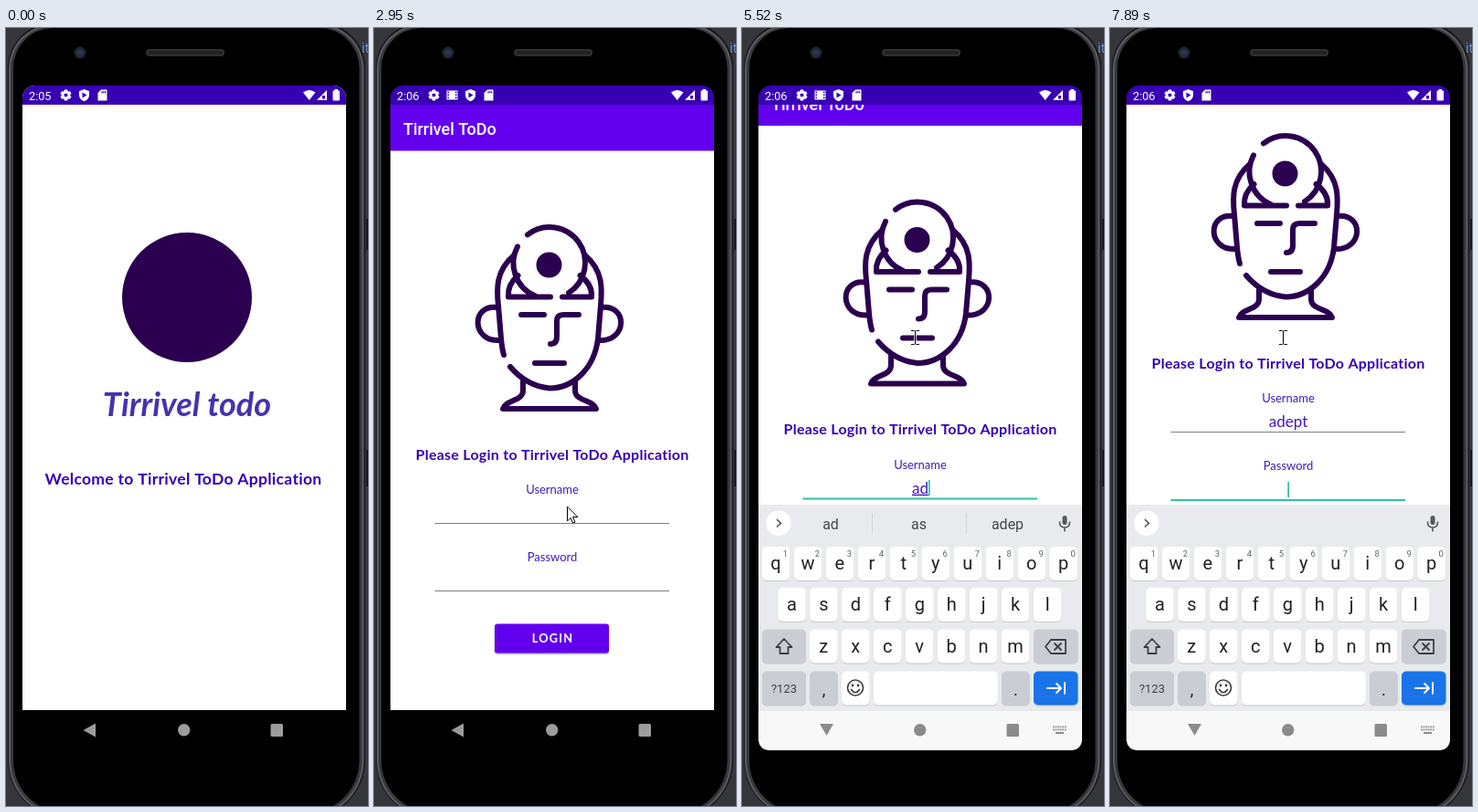
Recreate the animation shown at these times as an HTML page with a canvas. Size 396x852 px, loop 8 s.

```html
<!DOCTYPE html>
<html lang="en">
<head>
<meta charset="utf-8">
<title>Login walkthrough</title>
<style>
html, body { margin: 0; width: 100%; height: 100%; overflow: hidden; background: #000; }
canvas { display: block; width: 396px; height: 852px; }
</style>
</head>
<body>
<canvas id="stage"></canvas>
<script>
const W = 396, H = 852, LOOP = 8000;
const canvas = document.getElementById('stage');
const ratio = window.devicePixelRatio || 1;
canvas.width = W * ratio;
canvas.height = H * ratio;
const c = canvas.getContext('2d');

const APP = 'Tirrivel ToDo';
const PURPLE = '#6200ee', DEEP = '#3700b3', INK = '#2b0050', TEAL = '#2fc0ac';
const LATO = 'Lato, sans-serif', ROBOTO = 'Roboto, sans-serif';
const MID = 195;

// Timelines: [start ms, value...]; each value holds until the next start.
const POINTER = [
  [0], [1000, 'arrow', 363, 836], [1120, 'arrow', 350, 775], [1240, 'arrow', 333, 690],
  [1360, 'arrow', 322, 636], [1500, 'arrow', 315, 566], [1620, 'arrow', 310, 517],
  [1780, 'arrow', 289, 505], [1920, 'arrow', 283, 517], [2060, 'arrow', 283, 522],
  [2180, 'arrow', 283, 527], [2320, 'arrow', 283, 530], [2440, 'arrow', 283, 532],
  [2690, 'arrow', 281, 532], [2830, 'arrow', 250, 528], [2950, 'arrow', 211, 524],
  [3100, 'arrow', 207, 528], [3230, 'beam', 207, 540], [3880, 'beam', 178, 430],
  [4000, 'beam', 155, 343], [4120, 'beam', 172, 340], [4250, 'beam', 184, 339],
  [4370, 'beam', 189, 339]
];
const TYPED = [
  [0, '', 0], [4370, 'a', 0], [4740, 'a', 1], [5140, 'ad', 1], [5520, 'ad', 2],
  [6140, 'ade', 2], [6270, 'adep', 3], [6530, 'adep', 4], [7120, 'adept', 4],
  [7250, 'adept', 5], [7770, 'adept', 0]
];
const HINTS = [
  [0], [5140, 'a', 'as', 'and'], [5520, 'ad', 'as', 'adep'], [6270, 'ade', 'ads', 'adept'],
  [6780, 'adep', 'adept', 'adepts'], [7250, 'adept', 'adaptabilities', 'adaptableness'], [7770]
];
const SCROLL = [[0, 0], [3880, 12], [4000, 27.5], [7770, 78], [7890, 100]];
const CARET = [[0, ''], [3350, 'user'], [3880, ''], [4250, 'user'], [7520, ''], [7890, 'pass']];
const ENTER = [[0, 0, 0, 1], [500, 0.96, 0.6, 1.025], [620, 0.996, 1, 1.045], [750, 1, 1, 1]];

function at(line, t) {
  let hit = line[0];
  for (const step of line) if (step[0] <= t) hit = step;
  return hit.slice(1);
}

function text(str, x, y, font, color, align = 'center', spacing = 0) {
  c.font = font;
  c.fillStyle = color;
  c.textAlign = align;
  c.letterSpacing = spacing + 'px';
  c.fillText(str, x, y);
}
function rect(x, y, w, h, color) {
  c.fillStyle = color;
  c.fillRect(x, y, w, h);
}
function box(x, y, w, h, r, color) {
  c.beginPath();
  c.roundRect(x, y, w, h, r);
  c.fillStyle = color;
  c.fill();
}
function disc(x, y, r, color) {
  c.beginPath();
  c.arc(x, y, r, 0, 7);
  c.fillStyle = color;
  c.fill();
}
function ring(x, y, r, color, width) {
  c.beginPath();
  c.arc(x, y, r, 0, 7);
  c.strokeStyle = color;
  c.lineWidth = width;
  c.stroke();
}
function fill(d, color) {
  c.fillStyle = color;
  c.fill(new Path2D(d));
}
function line(d, color, width, cap = 'round') {
  c.strokeStyle = color;
  c.lineWidth = width;
  c.lineCap = cap;
  c.lineJoin = 'round';
  c.stroke(new Path2D(d));
}
function scoped(draw) {
  c.save();
  draw();
  c.restore();
}
function clipRect(x, y, w, h) {
  c.beginPath();
  c.rect(x, y, w, h);
  c.clip();
}
function zoom(s) {
  c.translate(MID, 413);
  c.scale(s, s);
  c.translate(-MID, -413);
}

function shell(left, right, top, color) {
  const r = 52 - left;
  box(left, top, right - left, 868 - top - left, [r, r, r + 14, r + 14], color);
}
function drawPhone() {
  rect(0, 0, W, H, '#34363a');
  text('it', 389, 27, '14px ' + ROBOTO, '#6f8fd0', 'left');
  shell(2, 393, -6, '#17181a');
  shell(3, 391.5, -4, '#5a5c62');
  shell(5, 389.5, -2, '#37383c');
  shell(8, 386.5, 0, '#000');
  rect(394, 209, 2, 34, '#15161a');
  rect(394, 462, 2, 40, '#15161a');
  disc(81, 27, 6.5, '#24272c');
  disc(81, 27, 3, '#26385e');
  box(153, 23, 86, 8, 4, '#303030');
  box(155, 25, 82, 4, 2, '#222');
}

function gear(x, y) {
  for (let i = 0; i < 6; i++) {
    const a = i * Math.PI / 3 + Math.PI / 6;
    line(`M${x} ${y}L${x + 6 * Math.cos(a)} ${y + 6 * Math.sin(a)}`, '#fff', 3.6, 'butt');
  }
  disc(x, y, 4.8, '#fff');
  disc(x, y, 2, DEEP);
}
function film(x, y) {
  rect(x - 6, y - 5, 12, 10, '#fff');
  for (let i = 0; i < 3; i++) {
    rect(x - 5, y - 4 + i * 3, 1.5, 1.7, DEEP);
    rect(x + 3.5, y - 4 + i * 3, 1.5, 1.7, DEEP);
  }
}
function shield(x, y) {
  fill(`M${x} ${y - 6.5}l5.5 2.2v4c0 3.5-2.5 6-5.5 7c-3-1-5.5-3.5-5.5-7v-4z`, '#fff');
  fill(`M${x - 2} ${y - 3}l5 3l-5 3z`, DEEP);
}
function card(x, y) {
  fill(`M${x - 1.5} ${y - 6}h6.5v12h-10v-8.5z`, '#fff');
  for (let i = 0; i < 3; i++) rect(x - 1 + i * 1.8, y - 4.5, 1, 2.5, DEEP);
}
function drawStatus(t) {
  text(t < 1000 ? '2:05' : '2:06', 25, 78.5, '12.7px ' + ROBOTO, '#fff', 'left');
  const icons = t >= 2060 && t < 6780 ? [gear, film, shield, card] : [gear, shield, card];
  icons.forEach((icon, i) => icon(65.5 + 20 * i, 73.5));
  fill('M325 70.5Q331.5 65.5 338.5 70.5L331.7 79z', '#fff');
  fill('M340 79H351V68z', '#fff');
  rect(346, 74, 3, 3.5, DEEP);
  box(357.5, 68.5, 7.5, 11, 1, '#fff');
  rect(359.5, 67, 3.5, 2, '#fff');
}

function drawNav(t) {
  const light = t >= 3880;
  const color = light ? '#8b8b8b' : '#9c9c9c';
  if (light) box(18, 748, 354, 43, [0, 0, 11, 11], '#f8f8f8');
  fill(t >= 4120 ? 'M85 762H100L92.5 775z' : 'M84.5 769L98 761.5V776.5z', color);
  disc(194.7, 768.7, 6.7, color);
  box(289.5, 762, 13.5, 14, 1.5, color);
  if (t < 3730) return;
  for (let row = 0; row < 2; row++)
    for (let i = 0; i < 6; i++) rect(340 + i * 2.6, 764.5 + row * 3, 1.7, 1.8, color);
  rect(343, 771, 9, 2, color);
}

function drawSplash() {
  rect(18, 63, 354, 684, '#fff');
  disc(198, 295, 71, INK);
  text('Tirrivel todo', 198, 425, 'italic 700 36px ' + LATO, '#4433b0');
  text(`Welcome to ${APP} Application`, 194, 499.5, '700 17.5px ' + LATO, DEEP, 'center', 0.3);
}

function drawHead() {
  const parts = [
    // crown
    'M168 226.4A39 39 0 1 1 213 290M157 239.3A39 39 0 0 0 176 293.3',
    'M147 294.5H193M206 294.5H238',
    'M157.5 271Q146 281 147 294M225.5 271Q239 281 238 294',
    // face outline
    'M153 249C133 266 134 286 136 304L139 340Q140 351 142 358',
    'M231 249C251 266 249.5 286 248 304L245 340C241 374 217 394.5 192 394.5Q167 392 149 371',
    // ears
    'M135 306C106 302 106 344 138 342M248 306C278 302 278 344 245 342',
    // features
    'M161 314H186M224 314H207Q200 314 200 321V338Q200 346 193 346M176 367H208',
    // neck
    'M163 387V397C163 409 144 407 141 417H243C240 407 220 409 220 397V387'
  ];
  parts.forEach(d => line(d, INK, 6));
  disc(191.5, 259.5, 14, INK);
}

function drawField(label, y, focused) {
  text(label, MID, y - 32.5, '13px ' + LATO, '#4318b8');
  if (focused) rect(66.5, y - 0.5, 256.5, 2, TEAL);
  else rect(66.5, y - 0.5, 256.5, 1, '#808080');
}

function drawForm(t) {
  rect(18, 84, 354, 763, '#fff');
  rect(18, 84, 354, 50.5, PURPLE);
  text(APP, 32, 117, '500 18px ' + ROBOTO, '#fff', 'left');
  drawHead();
  text(`Please Login to ${APP} Application`, MID, 472.5, '700 16px ' + LATO, DEEP, 'center', 0.25);
  drawField('Username', 542.5, t >= 3230 && t < 7770);
  drawField('Password', 616.5, t >= 7770);
  scoped(() => {
    c.shadowColor = 'rgba(0,0,0,.35)';
    c.shadowBlur = 2 * ratio;
    c.shadowOffsetY = 1.2 * ratio;
    box(132, 652.5, 125, 32, 3, PURPLE);
  });
  text('LOGIN', MID + 0.5, 673, '700 12.7px ' + LATO, '#fff', 'center', 1.2);

  const [name, marked] = at(TYPED, t);
  text(name, MID, 537, '17px ' + LATO, '#4318b8');
  const width = c.measureText(name).width, left = MID - width / 2;
  if (marked) rect(left, 538.3, c.measureText(name.slice(0, marked)).width, 1.2, DEEP);
  const [caret] = at(CARET, t);
  if (caret === 'user') rect(left + width, 522.5, 1.7, 17, TEAL);
  if (caret === 'pass') rect(194.3, 597, 1.7, 17, TEAL);
}

function drawLogin(t) {
  const [scroll] = at(SCROLL, t);
  scoped(() => {
    clipRect(18, 84, 354, 663);
    c.translate(0, -scroll);
    drawForm(t);
  });
}

function drawTools() {
  const g = '#55585d';
  ring(85.5, 540.5, 4.8, g, 1.7);
  line('M89 544L94 549', g, 2);
  line('M132 536H144Q145 536 145 537V543L139 549H132Q131 549 131 548V537Q131 536 132 536M145 543H140Q139 543 139 549', g, 1.7);
  disc(135.5, 540, 1.1, g);
  disc(140.5, 540, 1.1, g);
  text('GIF', 188, 546.5, '900 12.5px ' + ROBOTO, g);
  line('M233 536H245V550H233z', g, 1.7);
  rect(236, 534, 6, 4, g);
  line('M236 541H242M236 544H242M236 547H240', g, 1.2, 'butt');
  rect(270, 533, 1, 19, '#cfd2d6');
  for (let i = 0; i < 3; i++) disc(297 + i * 5.5, 542.5, 1.9, g);
}

function drawStrip(t) {
  const hints = at(HINTS, t);
  disc(40, 542.3, 13.7, '#fff');
  line(t < 5140 ? 'M42 538.5L38 542.3L42 546' : 'M38.5 538.5L42.5 542.3L38.5 546', '#55585d', 1.7);
  if (t < 5140) drawTools();
  hints.forEach((word, i) => {
    const size = word.length > 9 ? 14 : 16;
    text(word, [97, 193.5, 290.5][i], 549, `${size}px ${ROBOTO}`, '#45484d');
  });
  if (hints.length) [142, 245].forEach(x => rect(x, 532, 1, 21, '#cfd2d6'));
  box(350.5, 534, 5, 10, 2.5, '#55585d');
  line('M347.5 541Q347.5 547 353 547T358.5 541M353 547V551', '#55585d', 1.6);
}

function key(x, y, w, color = '#fff') {
  box(x, y + 1, w, 37, 5, '#c3c6cb');
  box(x, y, w, 37, 5, color);
}
function drawKeyboard(t) {
  const grey = '#cacdd4', ink = '#202124', icon = '#3c4043';
  rect(18, 522, 354, 226, '#e8eaed');
  drawStrip(t);
  [['qwertyuiop', 37, 568], ['asdfghjkl', 54.5, 613], ['zxcvbnm', 89.3, 658.5]].forEach(([row, x0, y]) => {
    [...row].forEach((ch, i) => {
      const x = x0 + i * 34.95;
      key(x - 15.3, y, 30.6);
      text(ch, x, y + 25, '20px ' + ROBOTO, ink);
      if (row.length === 10) text((i + 1) % 10, x + 10.5, y + 10.5, '9.5px ' + ROBOTO, '#5f6368');
    });
  });
  key(22, 658.5, 48, grey);
  line('M46 669L37.5 678H41.5V685H50.5V678H54.5z', icon, 1.8);
  key(319, 658.5, 48.5, grey);
  line('M338 670H354V685H338L332 677.5z', icon, 1.8);
  line('M342 674L349 681M349 674L342 681', icon, 1.8);

  key(22, 704.5, 48, grey);
  text('?123', 46, 728, '13px ' + ROBOTO, icon);
  key(74.2, 704.5, 30.6, grey);
  text(',', 89.5, 731, '18px ' + ROBOTO, ink);
  key(109, 704.5, 30.6);
  ring(124, 722.5, 8.5, icon, 1.7);
  disc(121, 720, 1.4, icon);
  disc(127, 720, 1.4, icon);
  line('M119.5 724.5Q124 731 128.5 724.5', icon, 1.7);
  key(143.8, 704.5, 136);
  key(284, 704.5, 30.6, grey);
  text('.', 299.3, 731, '18px ' + ROBOTO, ink);
  key(319, 704.5, 48.5, '#1a73e8');
  line('M334 723H349M344 718L349 723L344 728M353 717V729', '#fff', 2);
}

function drawPointer(t) {
  const [kind, x, y] = at(POINTER, t);
  if (!kind) return;
  c.save();
  c.translate(x, y);
  if (kind === 'arrow') {
    const d = 'M.5 .5V16L4 12.5L6.5 18L9 17L6.5 11.5H11.5z';
    fill(d, '#fff');
    line(d, '#000', 1);
  } else {
    line('M.5 -7V7M-4 -7.5H5M-4 7.5H5', '#fff', 2.5, 'butt');
    line('M.5 -7.5V7.5M-4 -7.5H-.5M1.5 -7.5H5M-4 7.5H-.5M1.5 7.5H5', '#000', 1, 'butt');
  }
  c.restore();
}

function drawScreen(t) {
  c.save();
  c.beginPath();
  c.roundRect(18, 63, 354, 728, [14, 14, 11, 11]);
  c.clip();
  const [scale, alpha, back] = at(ENTER, t);
  if (t < 750) {
    scoped(() => {
      clipRect(18, 63, 354, t < 500 ? 684 : 700);
      zoom(back);
      drawSplash();
    });
    rect(18, 63, 354, 21, DEEP);
  }
  if (t >= 500) scoped(() => {
    zoom(scale);
    c.globalAlpha = alpha;
    // Bars overlap the content slightly so no seam shows while scaled.
    rect(18, 63, 354, 22, DEEP);
    rect(18, 746, 354, 61, '#000');
    drawLogin(t);
  });
  drawStatus(t);
  if (t >= 3880) scoped(() => {
    clipRect(18, 84, 354, 664);
    c.translate(0, t < 4000 ? 100 : 0);
    drawKeyboard(t);
  });
  drawNav(t);
  c.restore();
}

const start = performance.now();
function frame() {
  const t = (performance.now() - start) % LOOP;
  c.setTransform(ratio, 0, 0, ratio, 0, 0);
  drawPhone();
  drawScreen(t);
  drawPointer(t);
  requestAnimationFrame(frame);
}
frame();
</script>
</body>
</html>
```
